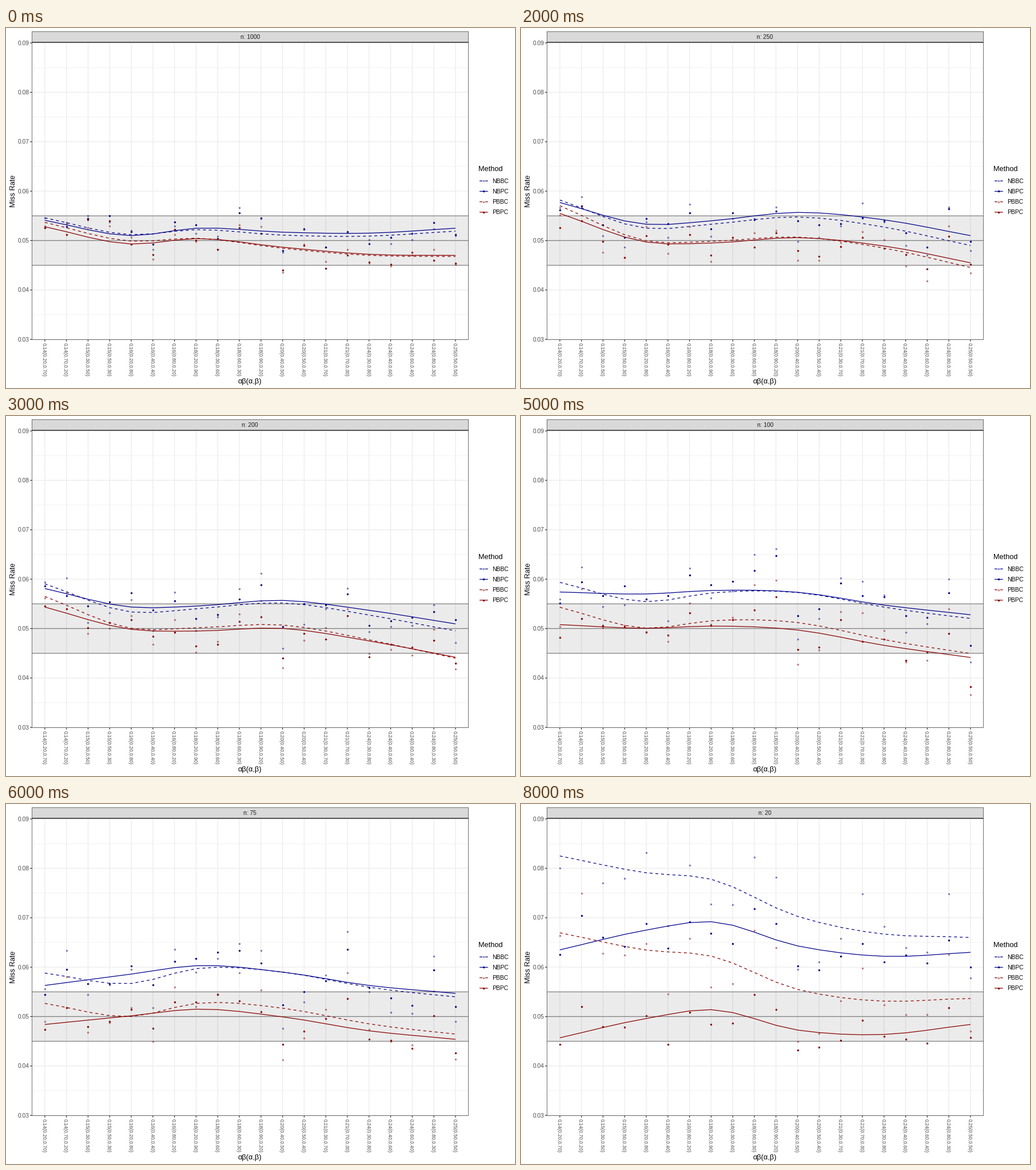
These frames come from a looping animation (890x629 px, 9 s). A matplotlib script:

```python
import numpy as np
import matplotlib.pyplot as plt
from matplotlib.animation import FuncAnimation
from matplotlib.patches import Rectangle

W, H, DPI = 890, 629, 100
PX = 72 / DPI
LEFT, RIGHT, STRIP, TOP, BOTTOM = 45.4, 808.4, 6.2, 25, 544.5
BLUE, RED = "#00008B", "#8B0000"
GREY, GRID, TICK = "#333333", "#EBEBEB", "#4D4D4D"

plt.rcParams["font.family"] = ["Liberation Sans", "DejaVu Sans"]

METHODS = [("NBBC", BLUE, True), ("NBPC", BLUE, False),
           ("PBBC", RED, True), ("PBPC", RED, False)]
PAIRS = ("20,70 70,20 30,50 50,30 20,80 40,40 80,20 20,90 30,60 60,30 "
         "90,20 40,50 50,40 30,70 70,30 30,80 40,60 60,40 80,30 50,50").split()
X = np.arange(1, 21)

# Tendency of each parameter pair to miss more or less often, in 1e-4
BIAS = np.array([-10, 63, -55, -25, 20, -80, 46, -30, -20, 75,
                 65, -110, -70, 12, 94, 20, -38, -28, 100, -62])


def px(i):
    return 67.9 + 37.79 * (np.asarray(i) - 1)


def py(rate):
    return 371.4 - (np.asarray(rate) - 0.05) * 8633


def spline(knots, values):
    """Smooth curve over X through a few key points."""
    knots, v = np.array(knots, float), np.array(values, float)
    slope = np.gradient(v, knots)
    k = np.clip(np.searchsorted(knots, X) - 1, 0, len(knots) - 2)
    h = knots[k + 1] - knots[k]
    t = (X - knots[k]) / h
    return ((1 + 2 * t) * (1 - t) ** 2 * v[k] + t * t * (3 - 2 * t) * v[k + 1]
            + h * t * (1 - t) * ((1 - t) * slope[k] - t * slope[k + 1]))


curves = {}


def scene(n, base, gap, lift):
    """NBPC curve, its distance to PBPC, and the rise of the BC methods."""
    nbpc = spline([1, 5, 8, 12, 16, 20], base)
    pbpc = nbpc - spline([1, 8, 20], gap)
    rise = spline([1, 5, 8, 20], lift)
    curves[n] = np.array([nbpc + rise, nbpc,
                          pbpc + rise + 25 * spread(n), pbpc])


def spread(n):
    return 1 / (1 + n / 180)


def scatter_around(n):
    rng = np.random.default_rng(n)
    noise = rng.normal(0, 18, 20) + rng.normal(0, 6, (4, 20))
    weight = np.array([[1.1 if faded else 0.5] for _, _, faded in METHODS])
    rates = curves[n] + spread(n) * weight * BIAS + noise
    return np.round(rates / 2) * 2


scene(1000, [541, 510, 525, 517, 515, 525], [13, 21, 55], [5, 2, -3, -6])
scene(250, [577, 533, 540, 557, 542, 510], [22, 45, 55], [5, -8, -7, -20])
scene(150, [585, 554, 551, 557, 532, 509], [53, 56, 80], [14, -12, -4, -8])
scene(75, [563, 586, 603, 590, 563, 547], [79, 88, 93], [25, -19, -6, -7])
scene(50, [632, 617, 606, 593, 593, 578], [125, 103, 127], [25, -9, 4, -5])
scene(20, [635, 675, 692, 643, 622, 630], [178, 178, 146], [190, 116, 86, 30])
for n, a, b in [(500, 1000, 250), (200, 250, 150), (100, 150, 75)]:
    curves[n] = (curves[a] + curves[b]) / 2

SIZES = sorted(curves, reverse=True)
samples = {n: scatter_around(n) for n in SIZES}

fig = plt.figure(figsize=(W / DPI, H / DPI), dpi=DPI, facecolor="white")
ax = fig.add_axes([0, 0, 1, 1])
ax.set(xlim=(0, W), ylim=(H, 0))
ax.axis("off")


def line(x, y, color, width, z, **kw):
    return ax.plot(x, y, color=color, lw=width * PX, zorder=z, snap=False,
                   solid_capstyle="butt", dash_capstyle="butt", **kw)[0]


def box(top, bottom, z, **kw):
    ax.add_patch(Rectangle((LEFT, top), RIGHT - LEFT, bottom - top,
                           zorder=z, snap=False, **kw))


def dots(x, y, color, faded):
    return ax.scatter(x, y, s=(3.4 * PX) ** 2, color=color, lw=0,
                      alpha=0.5 if faded else 1, zorder=5)


def text(x, y, s, size, color="black", **kw):
    return ax.text(x, y, s, fontsize=size * PX, color=color,
                   va="baseline", rotation_mode="anchor", **kw)


def label(x, y, s, size, color="black", ha="left"):
    return text(x, y + 0.36 * size, s, size, color, ha=ha)


# Grid, axes and tolerance band
for i in range(7):
    rate = 0.03 + i / 100
    y = py(rate)
    line([LEFT, RIGHT], [y, y], GRID, 1.25, 1)
    if i < 6:
        line([LEFT, RIGHT], [py(rate + 0.005)] * 2, GRID, 0.62, 1)
    line([LEFT - 3.2, LEFT], [y, y], GREY, 1.25, 7)
    label(40.6, y, f"{rate:.2f}", 10.25, TICK, "right")

for i, pair in zip(X, PAIRS):
    a, b = (int(v) / 100 for v in pair.split(","))
    x = px(i)
    line([x, x], [TOP, BOTTOM], GRID, 1.25, 1)
    line([x, x], [BOTTOM, BOTTOM + 3.2], GREY, 1.25, 7)
    text(x - 4.6, 550, f"{a * b + 1e-9:.2f}({a:.2f},{b:.2f})", 8.7, TICK,
         ha="left", rotation=-90)

box(py(0.055), py(0.045), 2, fc="black", alpha=0.08, lw=0)
for rate in (0.045, 0.05, 0.055):
    line([LEFT, RIGHT], [py(rate)] * 2, "#7F7F7F", 1.25, 3)

box(TOP, BOTTOM, 8, fill=False, ec=GREY, lw=0.7 * PX)
box(STRIP, TOP, 8, fc="#D9D9D9", ec=GREY, lw=0.7 * PX)
line([LEFT, RIGHT], [TOP, TOP], GREY, 1.25, 9)

text(15.6, 285, "Miss Rate", 12.8, ha="center", rotation=90)
label(426.8, 616, "αβ(α,β)", 12.8, ha="center")
title = label(426.8, 15.8, "", 10.25, "#1A1A1A", "center")
title.set_zorder(10)

# Legend and series
label(826, 245.7, "Method", 12.8)
lines, points = [], []
for k, (name, color, faded) in enumerate(METHODS):
    style = dict(ls=(0, (4, 4))) if faded else {}
    y = 267.2 + 18.2 * k
    line([828, 842.6], [y, y], color, 1.25, 6, **style)
    dots([835.3], [y], color, faded)
    label(850.5, y, name, 10.25)
    lines.append(line(px(X), px(X), color, 1.25, 6, **style))
    points.append(dots(px(X), px(X), color, faded))


def draw(i):
    n = SIZES[i]
    title.set_text(f"n: {n}")
    for ln, pt, curve, rates in zip(lines, points, curves[n], samples[n]):
        ln.set_ydata(py(curve / 1e4))
        pt.set_offsets(np.column_stack([px(X), py(rates / 1e4)]))
    return [title, *lines, *points]


anim = FuncAnimation(fig, draw, frames=len(SIZES), interval=1000,
                     repeat=True, repeat_delay=0, blit=False)
plt.show()
```
